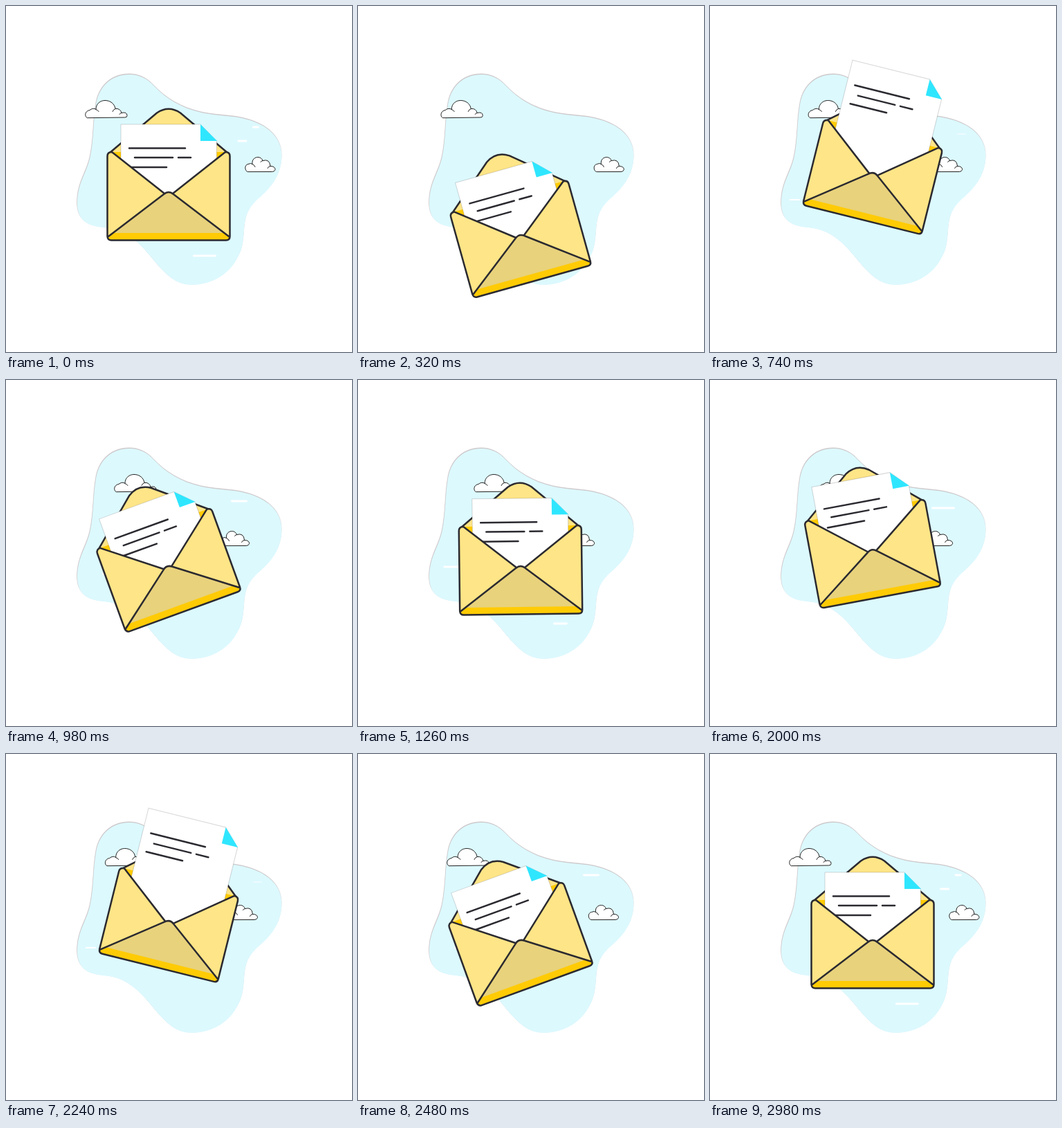
Animation, 500 px wide and 500 px high, one loop 3000 ms. Source, as an HTML page:

```html
<!DOCTYPE html>
<html lang="en">
<head>
<meta charset="utf-8">
<title>Letter in envelope</title>
<style>
  html, body { margin: 0; width: 100%; height: 100%; overflow: hidden; background: #fff; }
  svg { display: block; width: 100%; height: 100%; }
  .ink { stroke: #2b2a30; stroke-width: 2.5; stroke-linecap: round; stroke-linejoin: round; }
  .cloud { fill: #fff; stroke: #222; stroke-width: 1; stroke-linecap: round; stroke-linejoin: round; }
  .pale { fill: #fee587; }
  .gold { fill: #ffcb05; }
  .line { fill: none; }
</style>
</head>
<body>
<svg viewBox="0 0 500 500">
  <defs>
    <path id="blob" d="M178 98 C192 98 204 104 213 114 C231 133 252 146 282 153 C309 159 334 156 360 167
      C385 177 398 194 398 215 C398 240 386 258 368 274 C353 287 346 297 344 318 C342 342 342 352 330 370
      C316 391 292 402 268 402 C245 402 231 387 217 371 C202 353 190 337 168 326 C147 316 129 322 114 311
      C102 302 101 285 104 268 C108 248 117 236 121 218 C127 190 125 166 130 139 C135 113 154 98 178 98 Z"/>
  </defs>

  <use href="#blob" fill="#c9c3c5" stroke="#c9c3c5" stroke-width=".6"/>
  <use href="#blob" fill="#dcf9fe" x=".4" y="1.1"/>
  <g id="streaks" stroke="#fff" stroke-linecap="round"></g>

  <g id="cloudLeft" class="cloud">
    <path d="M117 161 C113 159 114 151 121 150 Q126 146 130 149 C130 140 137 136 143 136
      C151 136 157 141 158 148 Q165 147 167 154 Q175 152 175 158 Q175 160.5 172 160.5 Z"/>
    <path class="line" d="M130 149 Q133 150 134 152 M158 148 Q155 149 154 152 M167 154 Q165 154 164 156"/>
  </g>
  <g id="cloudRight" class="cloud">
    <path d="M349 239 C345 238 344 229 350 228 Q354 226 356 228 C355 221 360 218 364 218
      Q369 218 371 223 Q381 220 382 231 Q389 231 389 236 Q388 239 385 239 Z"/>
    <path class="line" d="M356 228 Q359 229 360 232 M371 223 Q369 223 368 225 M382 231 Q379 231 378 234"/>
  </g>

  <g id="envelope">
    <path class="pale ink" d="M150 212 L218 154.5 Q235 143 252 154.5 L320 212"/>
    <path class="gold" d="M151 211 H319 V336 H151 Z"/>
    <g id="letter">
      <path d="M166 171 H281 L304.5 195 V326 H166 Z" fill="#fff" stroke="#000" stroke-opacity=".16"/>
      <path d="M281 171 V195 H305 Z" fill="#2fe6ff"/>
      <path class="line ink" d="M178 205.5 H259 M186 219 H241 M249 219 H267 M178 233 H232"/>
    </g>
    <path class="gold" d="M147 333 L235 268 L323 333 Q323 338 318 338 H152 Q147 338 147 333 Z"/>
    <path d="M154 328 L228 272 Q235 266 242 272 L316 328 Z" fill="#e8d27c"/>
    <path class="pale" d="M146.5 217 Q147 211 153 211 L230 271 L147 333 Z"/>
    <path class="pale" d="M323.5 217 Q323 211 317 211 L240 271 L323 333 Z"/>
    <path class="line ink" d="M153 211 L229 271 M317 211 L241 271
      M148 333 L228 272 Q235 266 242 272 L322 333
      M153 211 Q146.5 211 146.5 217 V333 Q147 338.5 152 338.5 H318 Q323.5 338.5 323.5 333 V217 Q323.5 211 317 211"/>
  </g>
</svg>

<script>
const LOOP = 3000, JUMP = 1500;
const el = id => document.getElementById(id);
const clamp = v => Math.max(0, Math.min(1, v));
const setAll = (node, attributes) =>
  Object.entries(attributes).forEach(([name, value]) => node.setAttribute(name, value));

// Rises from 0 to 1 at the peak and falls back to 0 at the end.
const tent = (t, start, peak, end) =>
  clamp(Math.min((t - start) / (peak - start), (end - t) / (end - peak)));

// Like a tent, but stays at 1 between two ramps of equal length.
const plateau = (t, start, end, ramp) => clamp(Math.min(t - start, end - t) / ramp);

// Crouch, then leap.
const lift = t => 62 * tent(t, 0, 320, 450) - 71 * tent(t, 450, 600, 830);

// Swing left, right and left again.
const tilt = t => 20 * (tent(t, 600, 800, 890) - tent(t, 0, 410, 600) - tent(t, 890, 980, 1270));

const slide = t => 53 * plateau(t, 475, 930, 185);

// Cubic curve (.42, 0, .58, 1), solved by bisection.
function easeInOut(u) {
  let lo = 0, hi = 1;
  for (let i = 0; i < 24; i++) {
    const s = (lo + hi) / 2, r = 1 - s;
    if (1.26 * r * r * s + 1.74 * r * s * s + s * s * s < u) lo = s; else hi = s;
  }
  return lo * lo * (3 - 2 * lo);
}

// Each lane sends out streaks at a steady beat, alternating around its height.
const LIFE = 360, DRIFT = 0.11, WEIGHT = 2.8;
const lanes = [
  { x: 326, y: 185, sway: 10, length: 34, growth: -10, birth: 400, every: 480, count: 3 },
  { x: 352, y: 175, sway: 0, length: 10, growth: 0, birth: 1420, every: 0, count: 1 },
  { x: 118, y: 280, sway: 10, length: 20, growth: 2, birth: 700, every: 410, count: 2 },
  { x: 276, y: 352, sway: -9, length: 21, growth: 13, birth: 1110, every: 290, count: 2 }
];
const streaks = lanes.flatMap(lane => Array.from({ length: lane.count }, (_, i) => {
  const node = document.createElementNS("http://www.w3.org/2000/svg", "line");
  const y = lane.y + lane.sway * ((2 * i + 1) % 3 - 1);
  setAll(node, { y1: y, y2: y });
  el("streaks").append(node);
  return { node, x: lane.x, length: lane.length + lane.growth * i, birth: lane.birth + lane.every * i };
}));

function drawStreak({ node, x, length, birth }, phase) {
  const age = (phase - birth + JUMP) % JUMP;
  const grow = plateau(age, 0, LIFE, 50);
  const center = x + DRIFT * age, half = Math.max(0, length * grow - WEIGHT) / 2;
  setAll(node, { x1: center - half, x2: center + half, "stroke-width": WEIGHT * grow });
}

const shift = (id, x, y) => setAll(el(id), { transform: `translate(${x} ${y})` });

function draw(time) {
  const t = time % LOOP, phase = t % JUMP;
  const drift = easeInOut(1 - Math.abs(1 - t / JUMP));
  shift("cloudLeft", 56 * drift, 0.5);
  shift("cloudRight", -50 * drift, 0.5);
  setAll(el("envelope"), { transform: `translate(0 ${lift(phase)}) rotate(${tilt(phase)} 235 275)` });
  shift("letter", 0, -slide(phase));
  streaks.forEach(streak => drawStreak(streak, phase));
}

let start;
function frame(now) {
  start ??= now;
  draw(now - start);
  requestAnimationFrame(frame);
}
draw(0);
requestAnimationFrame(frame);
</script>
</body>
</html>
```
